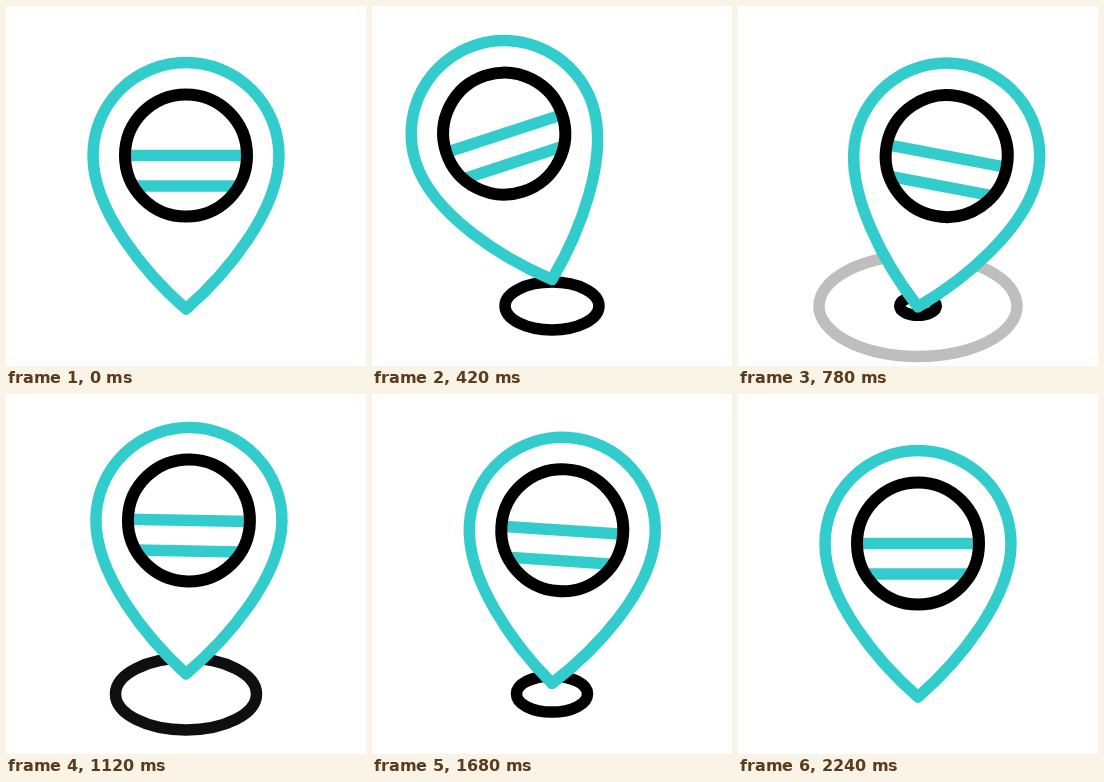
Write an HTML page that moves like this. It is 360 by 360 pixels and loops after 2.4 s.

```html
<!DOCTYPE html>
<html lang="en">
<head>
<meta charset="utf-8">
<title>Bouncing map pin</title>
<style>
  html, body { margin: 0; width: 100%; height: 100%; overflow: hidden; background: #fff; }
  svg { display: block; width: 100vw; height: 100vh; }
  ellipse, .ring { fill: none; stroke: #000; }
  .drop { fill: #fff; stroke: #33cccc; stroke-width: 11.5; stroke-linejoin: round; }
  .bars { stroke: #33cccc; stroke-width: 11.5; }
</style>
</head>
<body>
<svg viewBox="0 0 360 360">
  <g id="ripples" stroke-width="11.5"></g>
  <g id="pin">
    <path class="drop" d="M180 303C140 268 87 205 87 149.500A93 93 0 0 1 273 149.500C273 205 220 268 180 303Z"/>
    <path class="bars" d="M119 149.500H241M127 180H233"/>
    <circle class="ring" cx="180" cy="149.500" r="61" stroke-width="12"/>
  </g>
</svg>
<script>
  const LOOP = 2400;
  const MAX_RX = 104;
  const FLATNESS = 0.51;

  // [time in ms, value], eased between neighbours
  const lift = [[0, 0], [357, -32.3], [713, 0], [1080, -24], [1435, 0], [1830, -20], [2220, 0]];
  const tilt = [[0, 0], [395, -18.4], [907, 16], [1275, -8], [1711, 4], [2225, 0]];

  const ripples = [
    { start: 0, span: 900 },
    { start: 525, span: 960 },
    { start: 1300, span: 970 }
  ];

  const pin = document.getElementById('pin');
  const layer = document.getElementById('ripples');

  for (const ripple of ripples) {
    ripple.el = document.createElementNS('http://www.w3.org/2000/svg', 'ellipse');
    ripple.el.setAttribute('cx', 180);
    ripple.el.setAttribute('cy', 300);
    layer.append(ripple.el);
  }

  const clamp = x => Math.min(1, Math.max(0, x));
  const ease = x => x * x * (3 - 2 * x);

  function valueAt(keys, t) {
    const i = keys.findIndex(key => key[0] > t);
    if (i < 0) return keys[keys.length - 1][1];
    const [t0, a] = keys[i - 1];
    const [t1, b] = keys[i];
    return a + (b - a) * ease((t - t0) / (t1 - t0));
  }

  function drawRipple({ el, start, span }, t) {
    const p = (t - start) / span;
    const rx = MAX_RX * ease(clamp(p));
    el.setAttribute('rx', rx);
    el.setAttribute('ry', rx * FLATNESS);
    el.setAttribute('opacity', p > 0 ? 1 - clamp((p - 0.6) / 0.36) : 0);
  }

  function draw(t) {
    pin.setAttribute('transform',
      `translate(0 ${valueAt(lift, t)}) rotate(${valueAt(tilt, t)} 180 303)`);
    ripples.forEach(ripple => drawRipple(ripple, t));
  }

  const begin = performance.now();

  function tick() {
    draw((performance.now() - begin) % LOOP);
    requestAnimationFrame(tick);
  }

  tick();
</script>
</body>
</html>
```
